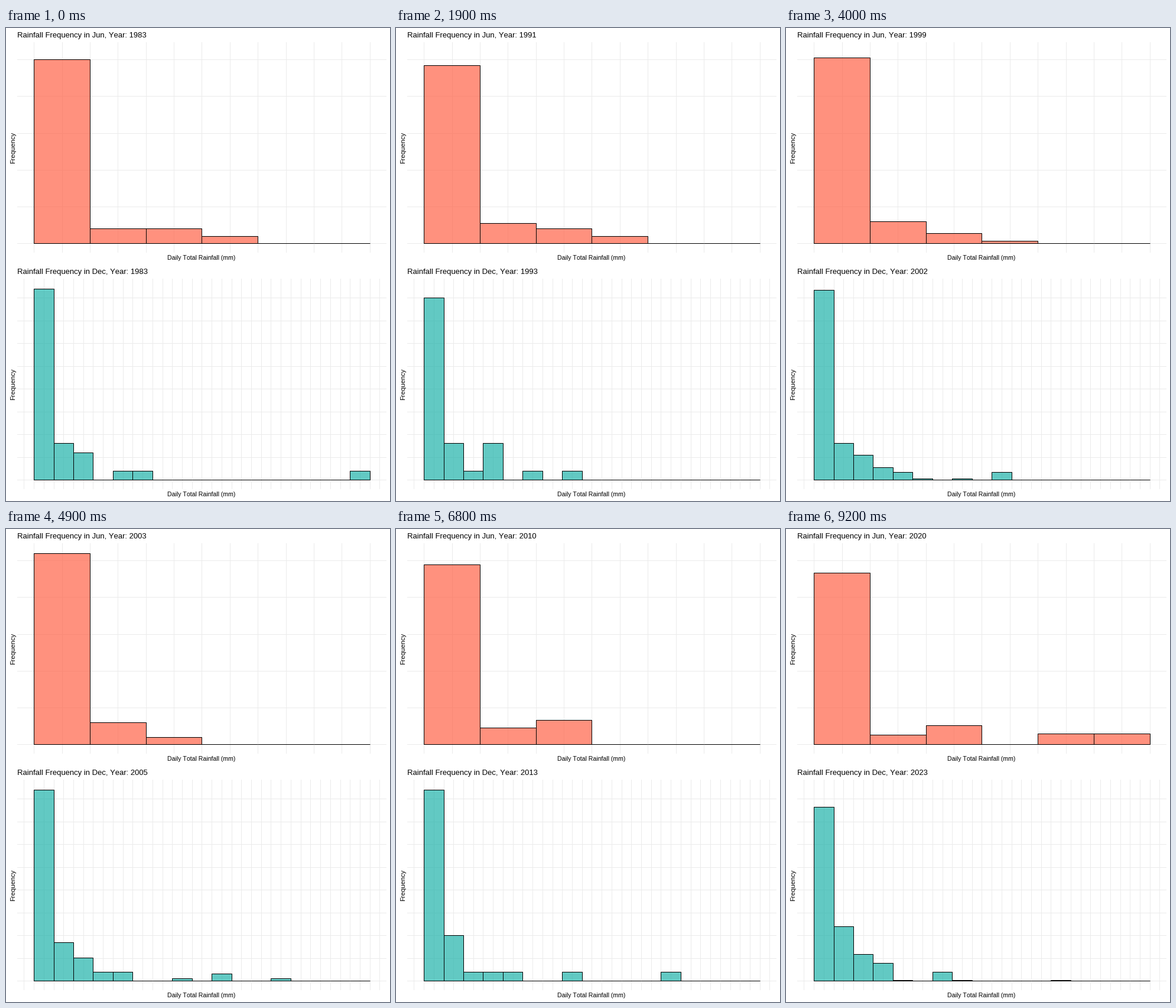
Animation, 650 px wide and 800 px high, one loop 9.3 s. Source, as a matplotlib script:

```python
import numpy as np
import matplotlib as mpl
import matplotlib.pyplot as plt
from matplotlib.animation import FuncAnimation
from matplotlib.colors import to_rgba
from matplotlib.patches import Rectangle

mpl.rcParams["font.family"] = "Liberation Sans"
mpl.rcParams["text.kerning_factor"] = 6

W, H, DPI = 650, 800, 100
PX = 72 / DPI              # one pixel in points
FRAMES, STEP_MS = 93, 100
LEFT, SPAN = 47.12, 568.6  # histogram extent in pixels
LAST_STEP = 99
DEC_LEAD = 6               # the December panel runs ahead after its first step

decade = np.arange(5)
key_steps = np.ceil(decade * LAST_STEP / 4 - 0.5)

fig = plt.figure(figsize=(W / DPI, H / DPI), dpi=DPI, facecolor="white")
ax = fig.add_axes([0, 0, 1, 1])
ax.set_xlim(0, W)
ax.set_ylim(H, 0)
ax.axis("off")


def june_counts():
    """Days per rainfall bin (rows) in each decade's key year (columns)."""
    days = np.zeros((6, 5))
    days[1] = 3.5 - abs(decade - 1.5)
    days[2] = [2, 2, 1, 4, 2]
    days[3] = decade < 2
    days[4:] = 2 * (decade == 4)
    days[0] = 30 - days.sum(axis=0)
    return days


def december_counts():
    days = np.zeros((17, 5))
    days[1] = 4 + np.maximum(0, decade - 2)
    days[2] = 3 - 2 * (decade % 2)
    days[3] = [0, 4, 1, 1, 2]
    days[4] = decade % 3 != 1
    days[5] = decade < 2
    days[7] = decade % 2
    days[[16, 7, 9, 12, 6], decade] = 1  # the wettest day
    days[0] = 31 - days.sum(axis=0)
    return days


def label(x, y, text, size, **kw):
    return ax.text(x, y, text, fontsize=size * PX, color="black",
                   va="baseline", **kw)


class Panel:
    def __init__(self, month, counts, color, top, base, unit,
                 grid_step, grid_end, overhang=0):
        self.month, self.counts = month, counts
        self.base, self.unit = base, unit
        bins = len(counts)

        style = dict(color="#EBEBEB", lw=PX, zorder=1)
        for k in range(-overhang, 2 * bins + 1 + overhang):
            x = round(LEFT + SPAN * k / (2 * bins))
            ax.plot([x, x], [top + 24, top + 379], **style)
        for count in np.arange(0, grid_end + grid_step, grid_step):
            y = self.height_to_y(count)
            ax.plot([19, 643], [y, y], **style)

        edges = [round(LEFT + SPAN * k / bins) for k in range(bins + 1)]
        self.bars = [
            ax.add_patch(Rectangle((a, round(base)), b - a, 0, lw=PX,
                                   fc=to_rgba(color, 0.7), ec="black",
                                   zorder=2))
            for a, b in zip(edges, edges[1:])
        ]
        self.title = label(19, top + 16, "", 13)
        label(331, top + 392, "Daily Total Rainfall (mm)", 10.5, ha="center")
        label(15, top + 202, "Frequency", 11.3, ha="center", rotation=90,
              rotation_mode="anchor")

    def height_to_y(self, count):
        return round(self.base - count * self.unit)

    def show(self, step):
        year = round(1983 + 40 * step / LAST_STEP)
        self.title.set_text(f"Rainfall Frequency in {self.month}, Year: {year}")
        floor = self.height_to_y(0)
        for bar, values in zip(self.bars, self.counts):
            y = self.height_to_y(np.interp(step, key_steps, values))
            bar.set_y(y)
            bar.set_height(floor - y)


june = Panel("Jun", june_counts(), "#FF6347", 0, 364.2, 12.445, 5, 25)
december = Panel("Dec", december_counts(), "#20B2AA", 400, 764.1, 15.405,
                 2.5, 20, overhang=1)


def update(i):
    june.show(i)
    december.show(i + DEC_LEAD if i else 0)
    return []


anim = FuncAnimation(fig, update, frames=FRAMES, interval=STEP_MS,
                     repeat=True, repeat_delay=0, blit=False)
plt.show()
```
